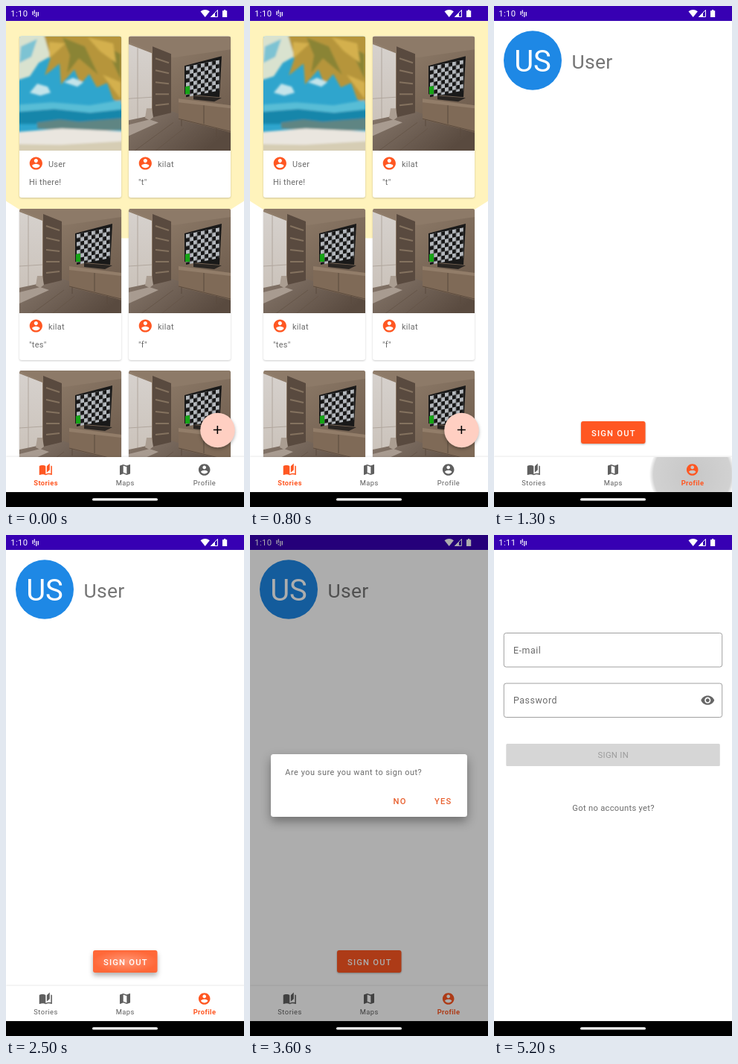
Recreate the animation shown at these times as an HTML page. Size 320 by 672 pixels, loop 6.6 s.

```html
<!DOCTYPE html>
<html lang="en">
<head>
<meta charset="utf-8">
<style>
html, body { margin: 0; width: 100%; height: 100%; overflow: hidden; background: #fff; }
svg { display: block; }
text { font-family: Roboto, sans-serif; font-size: 10.9px; letter-spacing: .3px; fill: #6b6b6b; }
.mid { text-anchor: middle; }
.caps { font-weight: 500; font-size: 11.2px; letter-spacing: 1.2px; }
.hint { font-size: 12.4px; letter-spacing: .55px; }
.answer { fill: #e8602f; }
.tab text { font-size: 9.33px; letter-spacing: .5px; }
.tab { fill: #5f5f5f; }
.tab text { fill: inherit; }
.tab.on { fill: #ff5722; }
.tab.on text { font-weight: 700; letter-spacing: .4px; }
.card { filter: drop-shadow(0 1px 1px rgba(0, 0, 0, .2)); }
</style>
</head>
<body>
<svg width="320" height="672" viewBox="0 0 320 672">
  <defs>
    <path id="book" d="M19 1l-5 5v11l5-4.5V1zM1 6v14.65c0 .25.25.5.5.5.1 0 .15-.05.25-.05C3.1 20.45 5.05 20 6.5 20c1.95 0 4.05.4 5.5 1.5V6c-1.45-1.1-3.55-1.5-5.5-1.5S2.45 4.9 1 6zm22 13.5V6c-.6-.45-1.25-.75-2-1v13.5c-1.1-.35-2.3-.5-3.5-.5-1.7 0-4.15.65-5.5 1.5v2c1.35-.85 3.8-1.5 5.5-1.5 1.65 0 3.35.3 4.75 1.05.1.05.15.05.25.05.25 0 .5-.25.5-.5v-1.1z"/>
    <path id="map" d="M20.5 3l-.16.03L15 5.1 9 3 3.36 4.9c-.21.07-.36.25-.36.48V20.5c0 .28.22.5.5.5l.16-.03L9 18.9l6 2.1 5.64-1.9c.21-.07.36-.25.36-.48V3.5c0-.28-.22-.5-.5-.5zM15 19l-6-2.11V5l6 2.11V19z"/>
    <path id="person" d="M12 2C6.48 2 2 6.48 2 12s4.48 10 10 10 10-4.48 10-10S17.52 2 12 2zm0 3c1.66 0 3 1.34 3 3s-1.34 3-3 3-3-1.34-3-3 1.34-3 3-3zm0 14.2c-2.5 0-4.71-1.28-6-3.22.03-1.99 4-3.08 6-3.08 1.99 0 5.97 1.09 6 3.08-1.29 1.94-3.5 3.22-6 3.22z"/>
    <path id="eye" d="M12 4.5C7 4.5 2.73 7.61 1 12c1.73 4.39 6 7.5 11 7.5s9.27-3.11 11-7.5c-1.73-4.39-6-7.5-11-7.5zM12 17c-2.76 0-5-2.24-5-5s2.24-5 5-5 5 2.24 5 5-2.24 5-5 5zm0-8c-1.66 0-3 1.34-3 3s1.34 3 3 3 3-1.34 3-3-1.34-3-3-3z"/>
    <path id="plus" d="M19 13h-6v6h-2v-6H5v-2h6V5h2v6h6v2z"/>
    <pattern id="checker" width="10" height="10" patternUnits="userSpaceOnUse">
      <path d="M0 0h10v10H0z" fill="#171717"/>
      <path d="M0 0h5v5H0zM5 5h5v5H5z" fill="#b4b8bd"/>
    </pattern>
    <linearGradient id="wall" x2=".6" y2="1"><stop stop-color="#95826f"/><stop offset="1" stop-color="#6d5b4c"/></linearGradient>
    <linearGradient id="window" x2="0" y2="1"><stop stop-color="#d6d1cd"/><stop offset="1" stop-color="#cbc3bb"/></linearGradient>
    <linearGradient id="floor" x2="1" y2=".5"><stop stop-color="#86776b"/><stop offset="1" stop-color="#594a3f"/></linearGradient>
    <radialGradient id="press"><stop stop-opacity=".22"/><stop offset=".9" stop-opacity=".18"/><stop offset="1" stop-opacity="0"/></radialGradient>
    <radialGradient id="glow"><stop stop-color="#fff" stop-opacity=".38"/><stop offset="1" stop-color="#fff" stop-opacity=".1"/></radialGradient>
    <filter id="soft"><feGaussianBlur stdDeviation="1.4"/></filter>
    <clipPath id="content"><path d="M0 20h320v632H0z"/></clipPath>
    <clipPath id="bar"><path d="M0 605h320v47H0z"/></clipPath>
    <clipPath id="frame"><path d="M0 160V3q0-3 3-3h131q3 0 3 3v157z"/></clipPath>

    <g id="room">
      <path d="M0 0h137v154H0z" fill="url(#wall)"/>
      <path d="M0 0h137v18L60 29 30 20 0 8z" fill="#8d7a68"/>
      <path d="M0 11l31 12v83l-31 9z" fill="url(#window)"/>
      <path d="M12 16v95M0 84l31-2" stroke="#b0a69d"/>
      <path d="M0 113l58-12 79 29v24H0z" fill="url(#floor)"/>
      <path d="M0 119l28-7 12 4-40 18z" fill="#a89b90"/>
      <path d="M8 154l52-38M36 154l38-30M66 154l24-20" stroke="#665649"/>
      <path d="M32 14l25 10v79l-25 6z" fill="#594a3f"/>
      <path d="M36 30l18 6M36 46l18 4M36 62l18 2M36 78h18M36 93l18-2" stroke="#84725f" stroke-width="2"/>
      <path d="M67 84l70 9v36l-70-17z" fill="#7f6a57"/>
      <path d="M67 84l70 9v4l-70-8z" fill="#927d69"/>
      <path d="M67 111l70 17M101 93v25M71 112v9M118 124v11" stroke="#5b4b3e"/>
      <path d="M24 97h7l2 12-5 4-6-3z" fill="#aa9d91"/>
      <path d="M87 80l38 3-10 5-28-3z" fill="#292522"/>
      <path d="M75 40l50-13-3 55-47-4z" fill="#191919"/>
      <path d="M0 0h45v38H0z" transform="matrix(1 -.2 0 1.08 77 41)" fill="url(#checker)"/>
      <path d="M76 68l6-1v11h-6z" fill="#16a316"/>
    </g>
    <g id="beach">
      <path d="M0 0h137v154H0z" fill="#2fa5cd"/>
      <g filter="url(#soft)">
        <path d="M-5-5h66L44 26 26 36 14 54-5 60z" fill="#d9e2cf"/>
        <path d="M2 14l22-10-8 24-16 8z" fill="#7dc3d3"/>
        <path d="M32-5h110v98l-16-8-8-22-14 6-10-18-12 14-8-20-18 20-2-28-20 16 8-24z" fill="#b6953a"/>
        <path d="M58 2l30 12 18 38-26-22-16 20 4-24zM116 14l20 10v34z" fill="#8a8436"/>
        <path d="M40 8l22 2-22 20zM92 2l34 8 4 26-22-16zM112 52l24 10v22z" fill="#d4b04e"/>
        <path d="M14 76l10-12 14 4 4 8-14 4zM60 62l12-6 14 6-8 6z" fill="#c4e4ea"/>
        <path d="M0 92l44-3 50 4 43-7v18H0z" fill="#58bdd6"/>
        <path d="M-5 102l52-4 48 5 47-5v20H-5z" fill="#1686aa"/>
        <path d="M24 116l30-4 26 3 62-5v16l-60 2-58-4z" fill="#5f8583"/>
        <path d="M-5 129l62-5 85 4v30H-5z" fill="#eae6df"/>
        <path d="M-5 145l60 1 87-5v17H-5z" fill="#d6cdb4"/>
      </g>
    </g>
  </defs>

  <path d="M0 0h320v672H0z" fill="#fff"/>
  <g clip-path="url(#content)">
    <g id="home">
      <g id="stories">
        <circle cx="160" cy="31" r="280.5" fill="#fff3bc"/>
        <g id="cards"></g>
        <circle cx="284.5" cy="569" r="23.3" fill="#ffcfc2" style="filter:drop-shadow(0 2px 2px rgba(0,0,0,.3))"/>
        <use href="#plus" transform="translate(275 559.2) scale(.78)"/>
      </g>
      <g id="profile">
        <path d="M-40 20h480v632H-40z" fill="#fff"/>
        <ellipse cx="52" cy="73" rx="39" ry="39.8" fill="#1e88e5"/>
        <text class="mid" x="52" y="87.5" style="font-size:40px;fill:#fff;letter-spacing:0">US</text>
        <text x="104.5" y="84" style="font-size:26.5px;fill:#757575">User</text>
        <rect id="signOut" x="117" y="557" width="86.5" height="30" rx="3" fill="#ff5722"/>
        <rect id="buttonGlow" x="117" y="557" width="86.5" height="30" rx="3" fill="url(#glow)"/>
        <text class="mid caps" x="160.8" y="576.7" style="fill:#fff">SIGN OUT</text>
      </g>
      <path d="M0 605h400v47H0z" fill="#fff" style="filter:drop-shadow(0 -1px 1px rgba(0,0,0,.08))"/>
      <g clip-path="url(#bar)"><circle id="tabPress" cx="266.7" cy="628.5" fill="url(#press)"/></g>
      <g id="tabs"></g>
    </g>
    <g id="signIn">
      <path d="M-40 20h400v632H-40z" fill="#fff"/>
      <g fill="none" stroke="#a0a0a0">
        <rect x="13.3" y="131.5" width="293.4" height="45.5" rx="3"/>
        <rect x="13.3" y="199" width="293.4" height="45.5" rx="3"/>
      </g>
      <text class="hint" x="26" y="158.6">E-mail</text>
      <text class="hint" x="26" y="226.2">Password</text>
      <use href="#eye" transform="translate(277.5 211.9) scale(.815)" fill="#666"/>
      <rect x="16.3" y="280" width="287.5" height="30" rx="1.5" fill="#d6d6d6"/>
      <text class="mid" x="160.3" y="299.2" style="font-size:11.3px;fill:#9c9c9c">SIGN IN</text>
      <text class="mid" x="160.6" y="370.2" style="font-size:11.2px">Got no accounts yet?</text>
    </g>
  </g>

  <path d="M0 0h320v20H0z" fill="#3700b3"/>
  <text id="clock" x="6.3" y="14.2" style="font-size:11.3px;fill:#fff"></text>
  <path d="M36 7v5M38.3 5.5v5M38.3 12v1.5M40.8 8v7M43.3 8v5.5" stroke="#fff" stroke-width="1.2"/>
  <g fill="#fff">
    <path d="M261.5 7.3q6.2-4.6 12.4 0l-6.2 7.7z"/>
    <path d="M275.5 14.5l9-9v9z" fill="none" stroke="#fff"/>
    <path d="M275 15l6-6v6z"/>
    <path d="M291 6.2h2V5h2.2v1.2h2V15H291z"/>
  </g>

  <path id="dim" d="M0 0h320v652H0z"/>
  <g id="dialog">
    <rect x="28" y="294" width="264" height="84" rx="3.5" fill="#fff" style="filter:drop-shadow(0 6px 7px rgba(0,0,0,.36))"/>
    <text x="47.3" y="322" style="letter-spacing:.54px">Are you sure you want to sign out?</text>
    <text class="caps answer" x="192.5" y="360.5">NO</text>
    <text class="caps answer" x="248" y="360.5">YES</text>
  </g>

  <path d="M0 652h320v20H0z"/>
  <rect x="116" y="660.2" width="88" height="3.4" rx="1.7" fill="#fff"/>
</svg>
<script>
const LOOP = 6600, STEP = 100;
const el = id => document.getElementById(id);
const ramp = (t, from, to) => Math.min(1, Math.max(0, (t - from) / (to - from)));
const setOpacity = (id, value) => el(id).setAttribute('opacity', value);
const shift = (id, x) => el(id).setAttribute('transform', `translate(${x})`);

// Photos are 154 high and cropped around their middle.
function card(x, y, imageHeight, photo, name, note) {
  return `<g transform="translate(${x} ${y})">
    <rect class="card" width="137" height="${imageHeight + 63}" rx="3" fill="#fff"/>
    <g clip-path="url(#frame)"><use href="#${photo}" y="${(imageHeight - 154) / 2}"/></g>
    <path d="M0 ${imageHeight}h137v20H0z" fill="#fff"/>
    <use href="#person" fill="#ff5722" transform="translate(12 ${imageHeight + 6.7}) scale(.86)"/>
    <text x="39" y="${imageHeight + 21.5}">${name}</text>
    <text x="13" y="${imageHeight + 46.3}">${note}</text>
  </g>`;
}

el('cards').innerHTML = [
  card(18, 40.5, 153.5, 'beach', 'User', 'Hi there!'),
  card(165, 40.5, 153.5, 'room', 'kilat', '"t"'),
  card(18, 272, 140, 'room', 'kilat', '"tes"'),
  card(165, 272, 140, 'room', 'kilat', '"f"'),
  card(18, 489, 140, 'room', 'kilat', ''),
  card(165, 489, 140, 'room', 'kilat', '')
].join('');

el('tabs').innerHTML = [['book', 'Stories'], ['map', 'Maps'], ['person', 'Profile']].map(([icon, label], i) => {
  const x = 53.3 + i * 106.7;
  return `<g class="tab"><use href="#${icon}" transform="translate(${x - 9.35} 612.6) scale(.78)"/>
    <text class="mid" x="${x + .3}" y="643.4">${label}</text></g>`;
}).join('');
const tabs = [...el('tabs').children];

// Solves y for a given x on one cubic segment.
function cubicAt(x, [x0, y0, x1, y1, x2, y2, x3, y3]) {
  const at = (u, a, b, c, d) => (1 - u) ** 3 * a + 3 * u * (1 - u) ** 2 * b + 3 * u * u * (1 - u) * c + u ** 3 * d;
  let low = 0, high = 1;
  for (let i = 0; i < 30; i++) {
    const u = (low + high) / 2;
    if (at(u, x0, x1, x2, x3) < x) low = u; else high = u;
  }
  return at(low, y0, y1, y2, y3);
}

const slideEase = x => x < 1 / 6
  ? cubicAt(x, [0, 0, .05, 0, .1333, .06, 1 / 6, .4])
  : cubicAt(x, [1 / 6, .4, .2083, .82, .25, 1, 1, 1]);

function draw(t) {
  el('clock').textContent = t < 5100 ? '1:10' : '1:11';

  const onProfile = t >= 1200;
  setOpacity('profile', ramp(t, 1150, 1300));
  tabs[0].classList.toggle('on', !onProfile);
  tabs[2].classList.toggle('on', onProfile);
  el('tabPress').setAttribute('r', 20 + 38 * ramp(t, 1050, 1300));
  setOpacity('tabPress', ramp(t, 1000, 1150) * (1 - ramp(t, 1350, 1600)));

  const press = ramp(t, 2350, 2500) * (1 - ramp(t, 2550, 2850));
  setOpacity('buttonGlow', press);
  el('signOut').style.filter = `drop-shadow(0 ${1 + 3 * press}px ${1 + 2 * press}px rgba(0,0,0,.3))`;

  const open = ramp(t, 2550, 2750) * (1 - ramp(t, 4050, 4150));
  const scale = .9 + .1 * ramp(t, 2550, 2750);
  setOpacity('dim', .32 * open);
  setOpacity('dialog', open);
  el('dialog').setAttribute('transform', `translate(160 336) scale(${scale}) translate(-160 -336)`);

  const start = 4116, slide = slideEase(ramp(t, start, start + 450));
  shift('home', -32 * slide);
  shift('signIn', 32 * (1 - slide));
  setOpacity('signIn', ramp(t, start + 50, start + 133));
}

function tick() {
  draw(Math.floor(performance.now() % LOOP / STEP) * STEP);
  requestAnimationFrame(tick);
}
tick();
</script>
</body>
</html>
```
